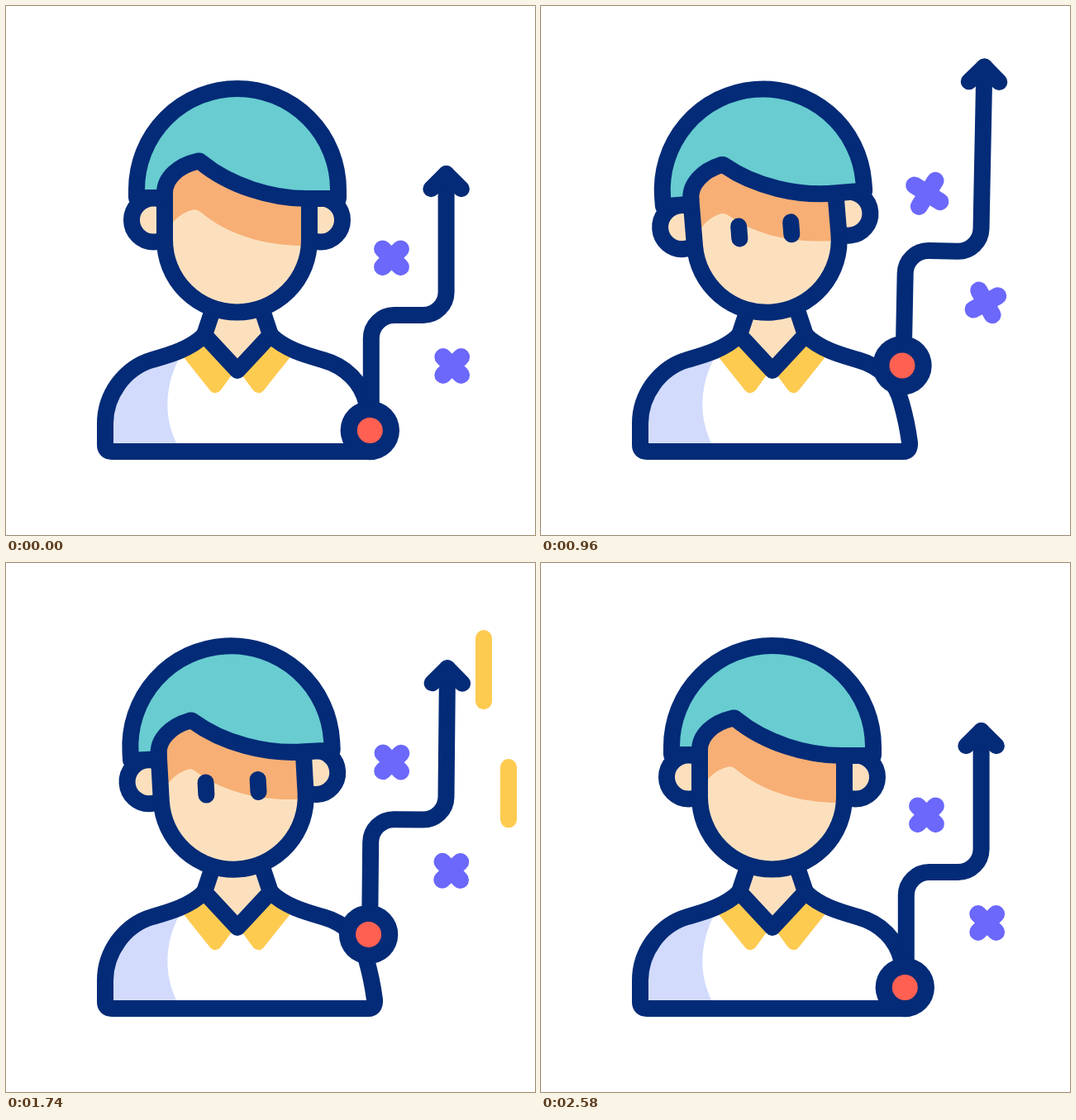
Recreate the animation shown at these times as an HTML page with a canvas. Size 640 by 640 pixels, loop 3 s.

```html
<!DOCTYPE html>
<html lang="en">
<head>
<meta charset="utf-8">
<title>Career growth</title>
<style>
  html, body { margin: 0; width: 100%; height: 100%; overflow: hidden; background: #fff; }
  canvas { display: block; width: 100vw; height: 100vh; }
</style>
</head>
<body>
<canvas id="stage" width="640" height="640"></canvas>
<script>
const ctx = document.getElementById('stage').getContext('2d');
const LOOP = 3000;
const LINE = 20;
const NAVY = '#032b77', TEAL = '#68ccd1', SKIN = '#fce0be', SHADE = '#f7af75';
const YELLOW = '#fecb51', LAVENDER = '#d2dbfc', RED = '#ff6052', PURPLE = '#6b68fb';

const clamp = u => Math.min(1, Math.max(0, u));
const mix = (a, b, u) => a + (b - a) * u;

// Eased progress from 0 to 1 between two times.
function ramp(t, from, to) {
  const u = clamp((t - from) / (to - from));
  return u * u * (3 - 2 * u);
}

function shape(d, fill, stroke, width = LINE) {
  const path = new Path2D(d);
  if (fill) { ctx.fillStyle = fill; ctx.fill(path); }
  if (stroke) { ctx.strokeStyle = stroke; ctx.lineWidth = width; ctx.stroke(path); }
}

function disc(x, y, r, fill, stroke) {
  ctx.beginPath();
  ctx.arc(x, y, r, 0, 2 * Math.PI);
  ctx.fillStyle = fill;
  ctx.fill();
  if (stroke) { ctx.strokeStyle = stroke; ctx.lineWidth = LINE; ctx.stroke(); }
}

function bar(x, y0, y1, color, width = LINE) {
  shape(`M${x} ${y0}L${x} ${y1}`, null, color, width);
}

function turned(x, y, deg, draw) {
  ctx.save();
  ctx.translate(x, y);
  ctx.rotate(deg * Math.PI / 180);
  draw();
  ctx.restore();
}

function clipped(d, draw) {
  ctx.save();
  ctx.clip(new Path2D(d));
  draw();
  ctx.restore();
}

// One half of the collar; side is -1 for left, 1 for right.
function collarFlap(side) {
  ctx.save();
  ctx.translate(279.3, 0);
  ctx.scale(side, 1);
  ctx.beginPath();
  ctx.moveTo(66, 423);
  ctx.arcTo(26, 473, 7, 449, 8);
  ctx.lineTo(0, 438);
  ctx.lineTo(39, 403);
  ctx.fillStyle = YELLOW;
  ctx.fill();
  ctx.restore();
}

const BODY = 'M240 398C223 415 198 422 177 428C143 438 120 471 120 505V531' +
  'Q120 539 128 539H438Q447 539 446 528C443 506 440 494 436 480' +
  'C430 456 412 436 383 428C362 422 337 415 320 398';
const NECK = 'M249 371L240 398L280 441L320 398L311 371';

function drawBody() {
  shape(BODY, '#fff');
  clipped(BODY, () => shape('M216 415C190 455 190 500 208 532V545H100V415Z', LAVENDER));
  collarFlap(-1);
  collarFlap(1);
  shape(NECK, SKIN, NAVY);
  shape(BODY, null, NAVY);
}

const FACE = 'M192 226V283A87.5 87.5 0 0 0 367 283V226';
const HAIR = 'M158 232V222A122 122 0 0 1 402 222V233H368' +
  'C322 234 270 217 236 189Q234 187 231 188C209 193 192 208 192 226L190 232Z';
const FOREHEAD = 'M192 276Q205 252 225 247Q230 245 235 249C270 278 315 291 370 290V190H192Z';

function drawHead(t) {
  // Rock from side to side, then ease upright.
  const beat = (Math.min(t, 1860) - 585) / 425;
  const tilt = 5 * Math.cos(Math.PI * Math.max(0, beat)) * (ramp(t, 240, 585) - ramp(t, 1880, 2390));
  const eyes = ramp(t, 700, 840) - ramp(t, 2160, 2300);
  turned(280, 360, tilt, () => {
    ctx.translate(-280, -360);
    for (const side of [-1, 1]) disc(279.5 + side * 101, 259, 26.5, SKIN, NAVY);
    shape(FACE, SKIN);
    clipped(FACE + 'V190H192Z', () => shape(FOREHEAD, SHADE));
    if (eyes > 0) {
      for (const side of [-1, 1]) {
        bar(278.5 + side * 31.6, 271 - 7.5 * eyes, 271 + 7.5 * eyes, NAVY, LINE * eyes);
      }
    }
    shape(FACE, null, NAVY);
    shape(HAIR, TEAL, NAVY);
  });
}

// A cross that swells and wobbles once, beginning at the given time.
function drawCross(t, x, y, begin) {
  const u = clamp((t - begin) / 820);
  const arm = 10.9 * (1 + 0.42 * Math.sin(Math.PI * u ** 1.3));
  turned(x, y, 20 * Math.sin(2 * Math.PI * u), () =>
    shape(`M${-arm} ${-arm}L${arm} ${arm}M${arm} ${-arm}L${-arm} ${arm}`, null, PURPLE, 21));
}

function drawArrow(t) {
  // Wind up outwards, snap back, rise, then sink home.
  const settle = ramp(t, 660, 980);
  const windUp = ramp(t, 240, 660) * (1 - settle);
  const snap = settle - ramp(t, 1233, 2200);
  const lean = 1.2 * snap - 6.4 * windUp;
  const sway = 34.4 * windUp - 3.7 * snap;
  const lift = 115 * (ramp(t, 500, 1230) - ramp(t, 1310, 2250));
  const stretch = 55 * (ramp(t, 513, 1020) - ramp(t, 1200, 1985));

  // Local origin is the centre of the red dot.
  turned(440.3 + sway, 513.5 - lift + lean, lean, () => {
    const x = 92.3, tip = -310.5 - stretch, wing = 18.3;
    shape(`M1.5 0V-111.5a28 28 0 0 1 28 -28H64.3a28 28 0 0 0 28 -28V${tip}`, null, NAVY);
    shape(`M${x - wing} ${tip + wing}L${x} ${tip}L${x + wing} ${tip + wing}`, NAVY, NAVY);
    disc(0, 0, 35.7, NAVY);
    disc(0, 0, 15.5, RED);
    drawCross(t, 26.2, -208.7, 240);
    drawCross(t, 99.4, -78, 850);
  });
}

// A vertical streak whose lower end runs ahead of its upper end.
function drawStreak(t, x, top, bottom, begin) {
  const head = ramp(t, begin, begin + 330);
  const tail = ramp(t, begin + 280, begin + 480);
  if (head > 0 && tail < 1) bar(x, mix(top, bottom, tail), mix(top, bottom, head), YELLOW);
}

function render(t) {
  ctx.fillStyle = '#fff';
  ctx.fillRect(0, 0, 640, 640);
  ctx.lineCap = ctx.lineJoin = 'round';
  drawStreak(t, 578, 91, 224, 1560);
  drawStreak(t, 608, 247, 332, 1520);
  drawStreak(t, 39, 240, 390, 2100);
  drawBody();
  drawHead(t);
  drawArrow(t);
}

const start = performance.now();
function tick() {
  render((performance.now() - start) % LOOP);
  requestAnimationFrame(tick);
}
tick();
</script>
</body>
</html>
```
